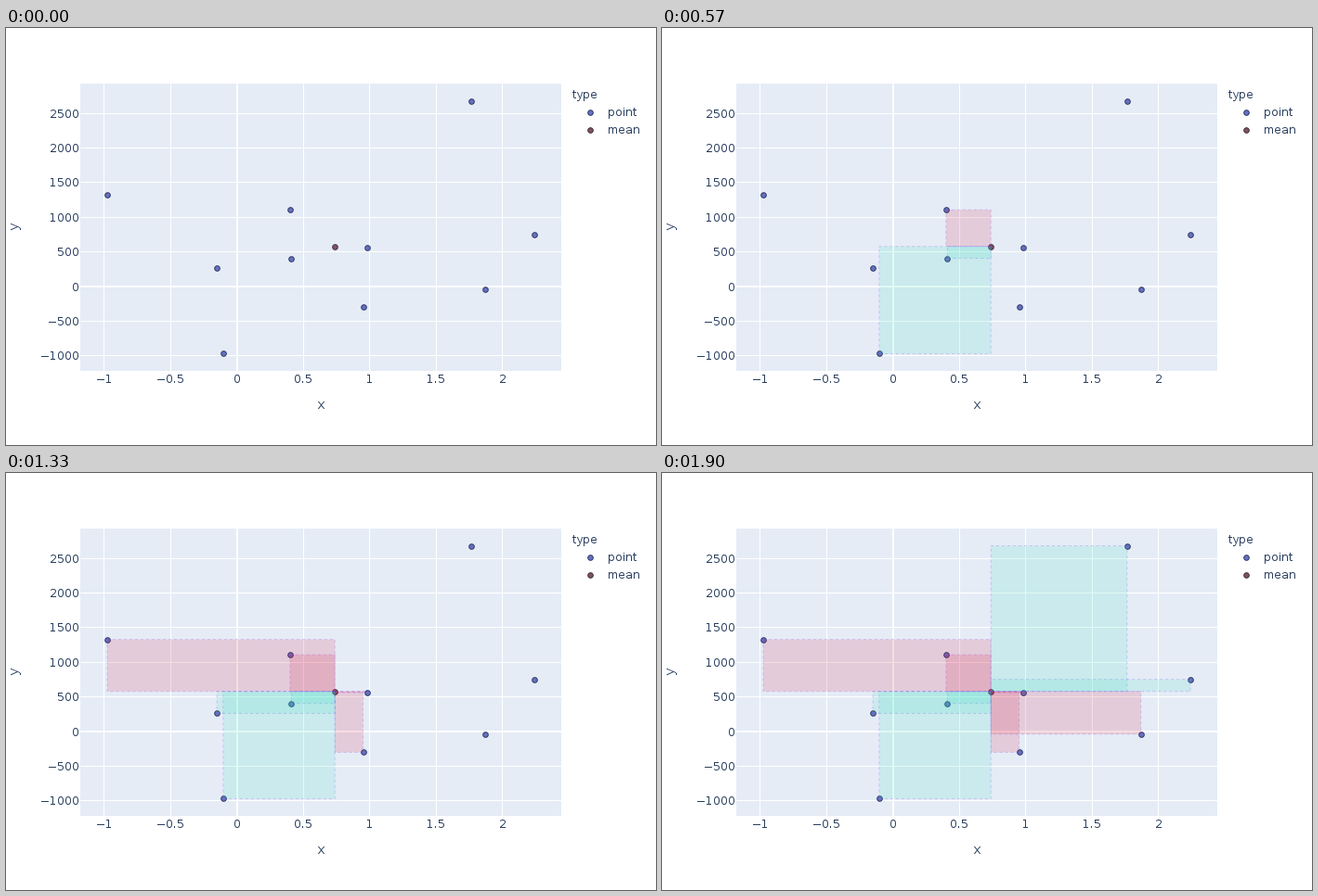
A matplotlib script that plays this animation: 700x450 px, repeating every 2.09 s.

```python
import numpy as np
import matplotlib.pyplot as plt
from matplotlib.animation import FuncAnimation
from matplotlib.patches import Rectangle

W, H, DPI = 700, 450, 100
PT = 72 / DPI  # points per pixel
LEFT, RIGHT, TOP, BOTTOM = 80, 598, 60, 370

INK = "#2a3f5f"
PANEL = "#e5ecf6"
POSITIVE = (48 / 255, 224 / 255, 190 / 255, 0.15)
NEGATIVE = (220 / 255, 20 / 255, 60 / 255, 0.15)
OUTLINE = (130 / 255, 60 / 255, 250 / 255, 0.23)
POINT = ("#6671c2", "#2f3b66")
MEAN = ("#86505e", "#3a3347")

# Listed in the order in which their rectangles appear
points = np.array([
    (0.400, 1110), (-0.103, -970), (0.411, 408), (-0.977, 1331),
    (0.979, 561), (0.950, -300), (-0.151, 262), (2.241, 755),
    (1.868, -38), (1.764, 2684),
])
mean = points.mean(axis=0)

plt.rcParams.update({
    "font.family": "DejaVu Sans",
    "text.hinting": "default",
    "text.hinting_factor": 1,  # whole-pixel glyph advances
})


def px(x):
    return 248.66 + 143 * x


def py(y):
    return 279.03 - 0.0747 * y


fig = plt.figure(figsize=(W / DPI, H / DPI), dpi=DPI, facecolor="white")
ax = fig.add_axes([0, 0, 1, 1])
ax.set_xlim(0, W)
ax.set_ylim(H, 0)
ax.axis("off")


def label(x, y, text, size=12, **kw):
    ax.text(x, y, text, size=size * PT, color=INK, va="baseline", **kw)


def dot(x, y, colors):
    face, edge = colors
    ax.plot(x, y, "o", ms=5.6 * PT, mfc=face, mec=edge, mew=PT, zorder=3,
            snap=False)


def grid(xs, ys, width=1):
    ax.plot(xs, ys, color="white", lw=width * PT, zorder=1,
            solid_capstyle="butt", snap=False)


def tick_text(v):
    return f"{v:g}".replace("-", "\u2212")


ax.add_patch(Rectangle((LEFT, TOP), RIGHT - LEFT, BOTTOM - TOP,
                       fc=PANEL, lw=0, zorder=0))

for v in np.arange(-1, 2.1, 0.5):
    if v:
        x = np.floor(px(v)) + 0.5
        grid([x, x], [TOP, BOTTOM])
    label(px(v), 383, tick_text(v), ha="center")

for v in range(-1000, 2501, 500):
    if v:
        y = np.floor(py(v)) + 0.5
        grid([LEFT, RIGHT], [y, y])
    label(78.5, py(v) + 4.5, tick_text(v), ha="right")

grid([249, 249], [TOP, BOTTOM], 2)
grid([LEFT, RIGHT], [279, 279], 2)

label(339, 411, "x", 14, ha="center")
label(14, 215, "y", 14, ha="center", rotation=90, rotation_mode="anchor")

label(610, 76, "type")
for y, name, colors in [(90.5, "point", POINT), (109.5, "mean", MEAN)]:
    dot(628.5, y, colors)
    label(648, y + 4.5, name)

for x, y in points:
    dot(px(x), py(y), POINT)
dot(px(mean[0]), py(mean[1]), MEAN)


def product_box(point):
    """Rectangle from a point to the mean, coloured by the product's sign."""
    dx, dy = point - mean
    x, y = px(point[0]), py(point[1])
    box = Rectangle((x, y), px(mean[0]) - x, py(mean[1]) - y,
                    fc=POSITIVE if dx * dy > 0 else NEGATIVE, ec=OUTLINE,
                    lw=PT, ls=(0, (3, 3)), zorder=4, snap=False,
                    visible=False)
    return ax.add_patch(box)


boxes = [product_box(p) for p in points]


def update(step):
    for i, box in enumerate(boxes):
        box.set_visible(i < step)
    return boxes


anim = FuncAnimation(fig, update, frames=len(boxes) + 1, interval=190,
                     repeat=True, repeat_delay=0, blit=False)
plt.show()
```
